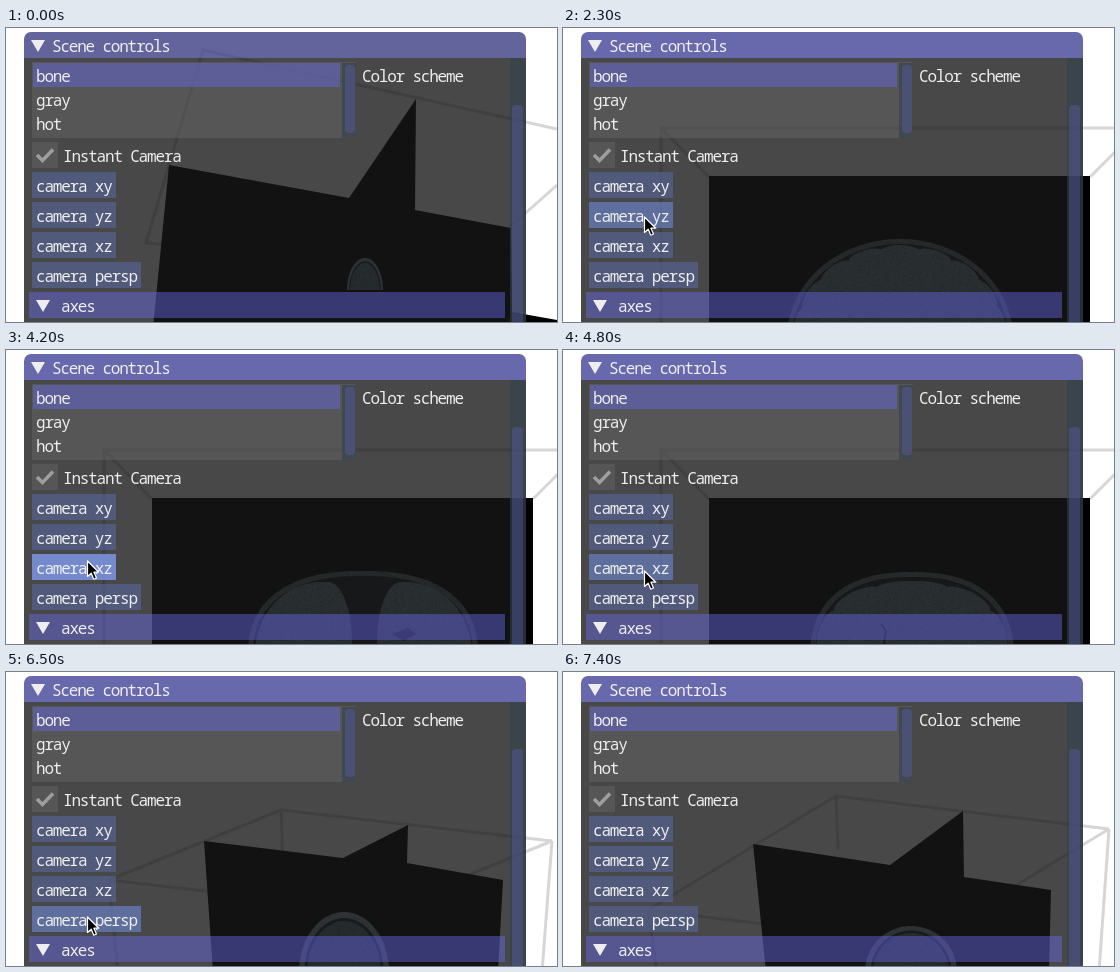
These frames come from a looping animation (551 px wide and 294 px high, 7600 ms). An HTML page with a canvas:

```html
<!DOCTYPE html>
<html lang="en">
<head>
<meta charset="utf-8">
<title>Scene controls</title>
<style>
html, body { margin: 0; width: 100%; height: 100%; overflow: hidden; background: #fff; }
canvas { display: block; }
</style>
</head>
<body>
<canvas id="stage" width="551" height="294"></canvas>
<script>
const ctx = document.getElementById('stage').getContext('2d');
const LOOP = 7600, STEP = 100, PITCH = 8.4;
const TEXT = '#eeeeee', GRID = '#d6d6d6', TISSUE = '#6a8089', GAP = '#151c1f';
const FRAME = 'rgba(110,110,110,.39)';
const HEADER = 'rgba(102,102,230,.45)';
const TRACK = 'rgba(51,64,77,.6)';
const GRAB = 'rgba(102,102,204,.3)';
const BUTTON = { idle: 'rgba(89,102,156,.62)', hover: 'rgba(102,122,181,.79)', down: '#758acc' };

const buttons = [
  { label: 'camera xy', press: 1200 },
  { label: 'camera yz', press: 2900 },
  { label: 'camera xz', press: 4200 },
  { label: 'camera persp', press: 5600 }
];

// Pointer travel: start time, number of steps, final y, easing power
const moves = [
  { at: 200, steps: 5, to: 156, power: 1.5 },
  { at: 2000, steps: 4, to: 189, power: 1 },
  { at: 3200, steps: 4, to: 211, power: 2 },
  { at: 4800, steps: 3, to: 241, power: 1 },
  { at: 5200, steps: 1, to: 245, power: 1 },
  { at: 6600, steps: 3, to: 310, power: 1.5 }
];

// box: back, right and left top corners; brain: centre x, base y, radii
const closeView = {
  slices: [163,137, 343,170, 410,71, 409,182, 505,200, 506,284, 551,292, 551,300, 147,300],
  brain: [359, 262, 18, 32]
};
const farView = {
  slices: [198,169, 337,186, 402,153, 401,191, 497,208, 492,300, 207,300],
  box: [275,138, 546,169, 103,208],
  brain: [338, 300, 45, 60]
};
const turnedView = {
  slices: [190,172, 327,193, 400,139, 401,205, 488,218, 486,300, 203,300],
  box: [273,124, 546,157, 85,238],
  brain: [348, 300, 46, 46]
};

const mix = (a, b, k) => a.map((v, i) => v + (b[i] - v) * k);

function pointerY(t) {
  let y = 0;
  for (const { at, steps, to, power } of moves) {
    if (t < at) break;
    const k = Math.min(1, (Math.floor((t - at) / STEP) + 1) / steps);
    y += (to - y) * k ** power;
  }
  return y;
}

function rect(x, y, w, h, fill, r = 0) {
  ctx.fillStyle = fill;
  ctx.beginPath();
  ctx.roundRect(x, y, w, h, r);
  ctx.fill();
}

function trace(p) {
  ctx.beginPath();
  for (let i = 0; i < p.length; i += 2) ctx.lineTo(p[i], p[i + 1]);
}

function poly(p, fill) {
  trace(p);
  ctx.closePath();
  ctx.fillStyle = fill;
  ctx.fill();
}

function line(p, color = GRID, width = 3) {
  trace(p);
  ctx.strokeStyle = color;
  ctx.lineWidth = width;
  ctx.stroke();
}

function text(s, x, y) {
  ctx.fillStyle = TEXT;
  ctx.fillText(s, x, y);
}

// Upper half of a superellipse, optionally with scalloped lobes
function dome(x, y, rx, ry, power = 2, lobes = 0) {
  const path = new Path2D();
  for (let i = 0; i <= 120; i++) {
    const a = Math.PI * (1 + i / 120), c = Math.cos(a), s = Math.sin(a);
    const r = lobes ? .96 + .04 * Math.sqrt(Math.abs(Math.sin(a * lobes))) : 1;
    path.lineTo(x + rx * r * Math.sign(c) * Math.abs(c) ** (2 / power),
                y - ry * r * Math.abs(s) ** (2 / power));
  }
  path.closePath();
  return path;
}

// Fill with fixed fine grain
function tissue(path, fill = TISSUE) {
  let seed = 7;
  const rnd = () => (seed = seed * 16807 % 2147483647) / 2147483647;
  ctx.fillStyle = fill;
  ctx.fill(path);
  ctx.save();
  ctx.clip(path);
  for (let i = 0; i < 5000; i++) {
    ctx.fillStyle = rnd() < .5 ? 'rgba(0,0,0,.18)' : 'rgba(190,215,225,.14)';
    ctx.fillRect(220 + rnd() * 260 | 0, 210 + rnd() * 84 | 0, 1, 1);
  }
  ctx.restore();
}

function boxEdges([bx, by, rx, ry, lx, ly]) {
  const near = [rx + lx - bx, ry + ly - by];
  line([lx, ly, bx, by, rx, ry]);
  line([lx, ly, ...near, rx, ry]);
  line([bx, by, bx + 2, by + 54]);
  line([rx, ry, rx - 10, 300]);
  line([lx, ly, lx + 9, 300]);
}

function perspective({ slices, brain: [x, y, rx, ry] }) {
  poly(slices, '#000');
  tissue(dome(x, y, rx, ry), '#7f97a5');
  ctx.fillStyle = '#1d262b';
  ctx.fill(dome(x, y, rx * .88, ry * .9));
  tissue(dome(x, y, rx * .82, ry * .85), '#59707c');
}

function startScene() {
  line([551,101, 197,22, 140,215, 163,217]);
  line([551,157, 505,198]);
  perspective(closeView);
}

function orbitScene(t) {
  const step = Math.max(0, Math.min(4, Math.floor((t - 6800) / STEP)));
  const k = t < 7400 ? step / 5 : 1;
  const view = {};
  for (const part in farView) view[part] = mix(farView[part], turnedView[part], k);
  boxEdges(view.box);
  perspective(view);
}

function skull(x, y, rx, ry, power) {
  tissue(dome(x, y, rx, ry, power), '#5c696e');
  ctx.fillStyle = GAP;
  ctx.fill(dome(x, y, rx - 5, ry - 5, power));
}

const sections = [
  function xy() {
    skull(337, 310, 113, 99, 2);
    tissue(dome(337, 310, 107, 93, 2, 9));
  },
  function yz() {
    skull(357, 306, 115, 85, 2.4);
    const lobes = new Path2D();
    const outer = { x: 66, y: 72 }, inner = { x: 24, y: 60 };
    lobes.roundRect(249, 232, 97, 140, [outer, inner, 0, 0]);
    lobes.roundRect(371, 232, 95, 140, [inner, outer, 0, 0]);
    tissue(lobes);
    poly([386,284, 402,278, 410,284, 398,291], GAP);
  },
  function xz() {
    skull(349, 308, 102, 86, 2.4);
    tissue(dome(349, 308, 97, 77, 2.4, 5));
    line([318,274, 323,281, 321,294], GAP, 2);
  }
];

function flatScene(drawSection) {
  line([551,100, 98,100, 98,300]);
  line([98,100, 146,149]);
  line([527,149, 580,96]);
  rect(146, 148, 381, 152, '#000');
  drawSection();
}

function scene(t) {
  const clicked = buttons.filter(b => t >= b.press + STEP).length;
  if (!clicked) startScene();
  else if (clicked > sections.length) orbitScene(t);
  else flatScene(sections[clicked - 1]);
}

function panel(t, y) {
  const focused = t >= buttons[0].press;
  rect(18, 4, 502, 26, focused ? 'rgba(82,82,161,.87)' : 'rgba(69,69,138,.83)', [7, 7, 0, 0]);
  rect(18, 30, 502, 264, 'rgba(23,23,23,.79)');
  poly([25,12, 39,12, 32,24], TEXT);
  text('Scene controls', 46, 24);

  rect(26, 34, 324, 76, FRAME);
  rect(27, 35, 307, 24, HEADER);
  rect(336, 35, 14, 75, TRACK);
  rect(339, 37, 10, 68, GRAB, 4);
  ['bone', 'gray', 'hot'].forEach((s, i) => text(s, 30, 54 + i * 24));
  text('Color scheme', 356, 54);

  rect(26, 114, 26, 26, FRAME);
  line([31,127, 36.5,132.5, 47,121.5], 'rgba(230,230,230,.5)', 3.5);
  text('Instant Camera', 57, 134);

  buttons.forEach(({ label, press }, i) => {
    const top = 144 + i * 30;
    const over = focused && y >= top && y < top + 26;
    const down = t >= press && t < press + STEP;
    rect(26, top, Math.round(label.length * PITCH + 8), 26, BUTTON[down ? 'down' : over ? 'hover' : 'idle']);
    text(label, 30, top + 20);
  });

  rect(23, 264, 476, 26, HEADER);
  poly([30,272, 44,272, 37,284], TEXT);
  text('axes', 55, 284);

  rect(504, 30, 16, 264, TRACK);
  rect(506, 77, 11, 230, GRAB, 4);
}

function cursor(y) {
  ctx.save();
  ctx.translate(81.5, y);
  ctx.lineJoin = 'round';
  poly([0,0, 0,15.5, 3.7,12.2, 6.3,18.2, 9,17, 6.4,11.2, 11.3,11.2], '#000');
  ctx.strokeStyle = '#fff';
  ctx.lineWidth = 1.2;
  ctx.stroke();
  ctx.restore();
}

function draw(now) {
  const t = now % LOOP;
  const y = pointerY(t);
  ctx.fillStyle = '#fff';
  ctx.fillRect(0, 0, 551, 294);
  scene(t);
  panel(t, y);
  if (y > 0) cursor(y);
  requestAnimationFrame(draw);
}

ctx.font = '500 16px "Noto Sans Mono", "DejaVu Sans Mono", monospace';
ctx.fontStretch = 'extra-condensed';
ctx.letterSpacing = PITCH - ctx.measureText('m').width + 'px';
requestAnimationFrame(draw);
</script>
</body>
</html>
```
